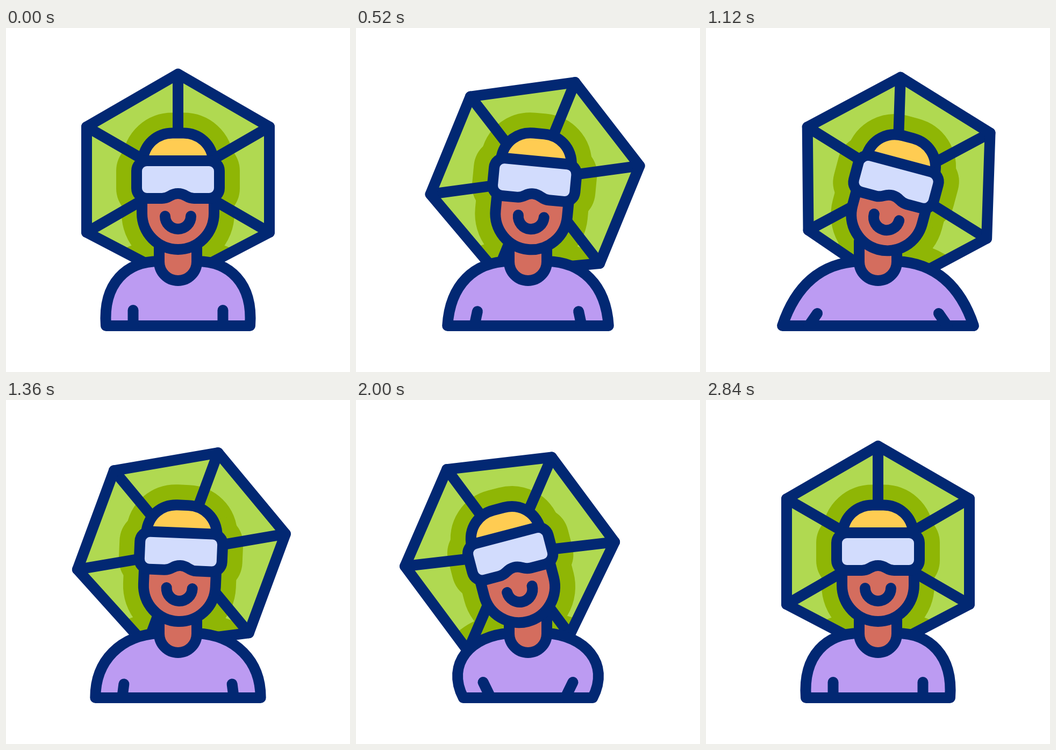
Recreate the animation shown at these times as an HTML page with a canvas. Size 640 px wide and 640 px high, loop 3000 ms.

```html
<!DOCTYPE html>
<html lang="en">
<head>
<meta charset="utf-8">
<title>Headset avatar</title>
<style>
  html, body { margin: 0; width: 100%; height: 100%; overflow: hidden; background: #fff; }
  canvas { display: block; width: 640px; height: 640px; }
</style>
</head>
<body>
<canvas id="stage" width="640" height="640"></canvas>
<script>
const ctx = document.getElementById('stage').getContext('2d');

const LOOP = 3000, STEP = 40;
const NAVY = '#022873', LIME = '#b0d951', OLIVE = '#8fb605', LILAC = '#bc9bf2';
const SKIN = '#d46d5e', HAIR = '#ffcc52', GLASS = '#d2dcfd';
const LINE = 20, HALO = 76;
const NECK_Y = 412, HUB_Y = 285, HEX_Y = 282;
const RADIUS = 196.3, LOW_RADIUS = 187;

// Left half of the torso; the right half is mirrored.
const REST = { tilt: 0, spin: 0, hem: 186, c1x: 180, c1y: 474, c2x: 225, c2y: 434,
               armX: 236.5, armY: 525, cuffX: 236.5 };
const RIGHT = { tilt: 15, spin: 47, hem: 142, c1x: 166, c1y: 482, c2x: 212, c2y: 437,
                armX: 207, armY: 531, cuffX: 191 };
const LEFT = { tilt: -15, spin: -22.5, hem: 200, c1x: 166, c1y: 490, c2x: 215, c2y: 438,
               armX: 236.5, armY: 525, cuffX: 251 };

// Cubic easing with y control points 0 and 1.
function ease(x1, x2) {
  return u => {
    let lo = 0, hi = 1;
    for (let i = 0; i < 24; i++) {
      const s = (lo + hi) / 2, r = 1 - s;
      const x = 3 * x1 * s * r * r + 3 * x2 * s * s * r + s * s * s;
      if (x < u) lo = s; else hi = s;
    }
    return lo * lo * (3 - 2 * lo);
  };
}

const soft = ease(0.167, 0.833), snappy = ease(0.4, 0.2);
const moves = [
  { from: 180, to: 1070, a: REST, b: RIGHT, curve: soft },
  { from: 1100, to: 1915, a: RIGHT, b: LEFT, curve: snappy },
  { from: 1915, to: 2795, a: LEFT, b: REST, curve: snappy }
];

function poseAt(t) {
  const m = moves.filter(m => t >= m.from).pop() || moves[0];
  const u = (t - m.from) / (m.to - m.from);
  const k = m.curve(Math.min(1, Math.max(0, u)));
  const pose = {};
  for (const key in REST) pose[key] = m.a[key] + (m.b[key] - m.a[key]) * k;
  return pose;
}

const skull = new Path2D(
  'M254 250C256 215 282 195.5 310 195.5H330C358 195.5 384 215 386 250Z');
const face = new Path2D('M253 317V345A67 67 0 0 0 387 345V317');
const goggles = new Path2D(
  'M262 247H378A19 19 0 0 1 397 266V298A19 19 0 0 1 378 317H350' +
  'C335 317 335 308 320 308C305 308 305 317 290 317H262' +
  'A19 19 0 0 1 243 298V266A19 19 0 0 1 262 247Z');
const smile = new Path2D('M296 350A24 24 0 0 0 344 350');
const neck = new Path2D('M285 396V435A35 35 0 0 0 355 435V396');

// The lowest corner sits a little closer to the centre.
const hexagon = new Path2D(), spokes = new Path2D();
for (let i = 0; i < 6; i++) {
  const a = i * Math.PI / 3, r = i === 3 ? LOW_RADIUS : RADIUS;
  const x = r * Math.sin(a), y = -r * Math.cos(a);
  hexagon.lineTo(x, y);
  spokes.moveTo(0, 0);
  spokes.lineTo(x, y);
}
hexagon.closePath();

function torsoPath(p) {
  const path = new Path2D(), m = x => 640 - x;
  path.moveTo(p.hem, 554);
  path.bezierCurveTo(p.c1x, p.c1y, p.c2x, p.c2y, 285, 434);
  path.lineTo(355, 434);
  path.bezierCurveTo(m(p.c2x), p.c2y, m(p.c1x), p.c1y, m(p.hem), 554);
  path.closePath();
  return path;
}

function stroke(path, color = NAVY, width = LINE) {
  ctx.strokeStyle = color;
  ctx.lineWidth = width;
  ctx.stroke(path);
}

function shape(path, color) {
  ctx.fillStyle = color;
  ctx.fill(path);
  stroke(path);
}

function within(fn) {
  ctx.save();
  fn();
  ctx.restore();
}

function turn(y, deg) {
  ctx.translate(320, y);
  ctx.rotate(deg * Math.PI / 180);
}

function leanHead(p) {
  turn(NECK_Y, p.tilt);
  ctx.translate(-320, -NECK_Y);
}

function placeHex(p) {
  leanHead(p);
  turn(HUB_Y, p.spin);
  ctx.translate(0, HEX_Y - HUB_Y);
}

function drawBackdrop(p, torso) {
  within(() => {
    placeHex(p);
    ctx.fillStyle = LIME;
    ctx.fill(hexagon);
    ctx.clip(hexagon);
    ctx.setTransform(1, 0, 0, 1, 0, 0);
    stroke(torso, OLIVE, HALO);
    leanHead(p);
    for (const part of [skull, face, goggles]) {
      ctx.fillStyle = OLIVE;
      ctx.fill(part);
      stroke(part, OLIVE, HALO);
    }
  });
  within(() => {
    placeHex(p);
    stroke(spokes);
    stroke(hexagon);
  });
}

function drawBody(p, torso) {
  shape(torso, LILAC);
  const arms = new Path2D();
  for (const side of [x => x, x => 640 - x]) {
    arms.moveTo(side(p.armX), p.armY);
    arms.lineTo(side(p.cuffX), 554);
  }
  stroke(arms);
  shape(neck, SKIN);
}

function drawHead(p) {
  within(() => {
    leanHead(p);
    shape(skull, HAIR);
    shape(face, SKIN);
    shape(goggles, GLASS);
    stroke(smile);
  });
}

function draw(t) {
  const p = poseAt(t), torso = torsoPath(p);
  ctx.setTransform(1, 0, 0, 1, 0, 0);
  ctx.fillStyle = '#fff';
  ctx.fillRect(0, 0, 640, 640);
  ctx.lineCap = ctx.lineJoin = 'round';
  drawBackdrop(p, torso);
  drawBody(p, torso);
  drawHead(p);
}

const start = performance.now();
function tick() {
  const t = (performance.now() - start) % LOOP;
  draw(Math.floor(t / STEP) * STEP);
  requestAnimationFrame(tick);
}
tick();
</script>
</body>
</html>
```
